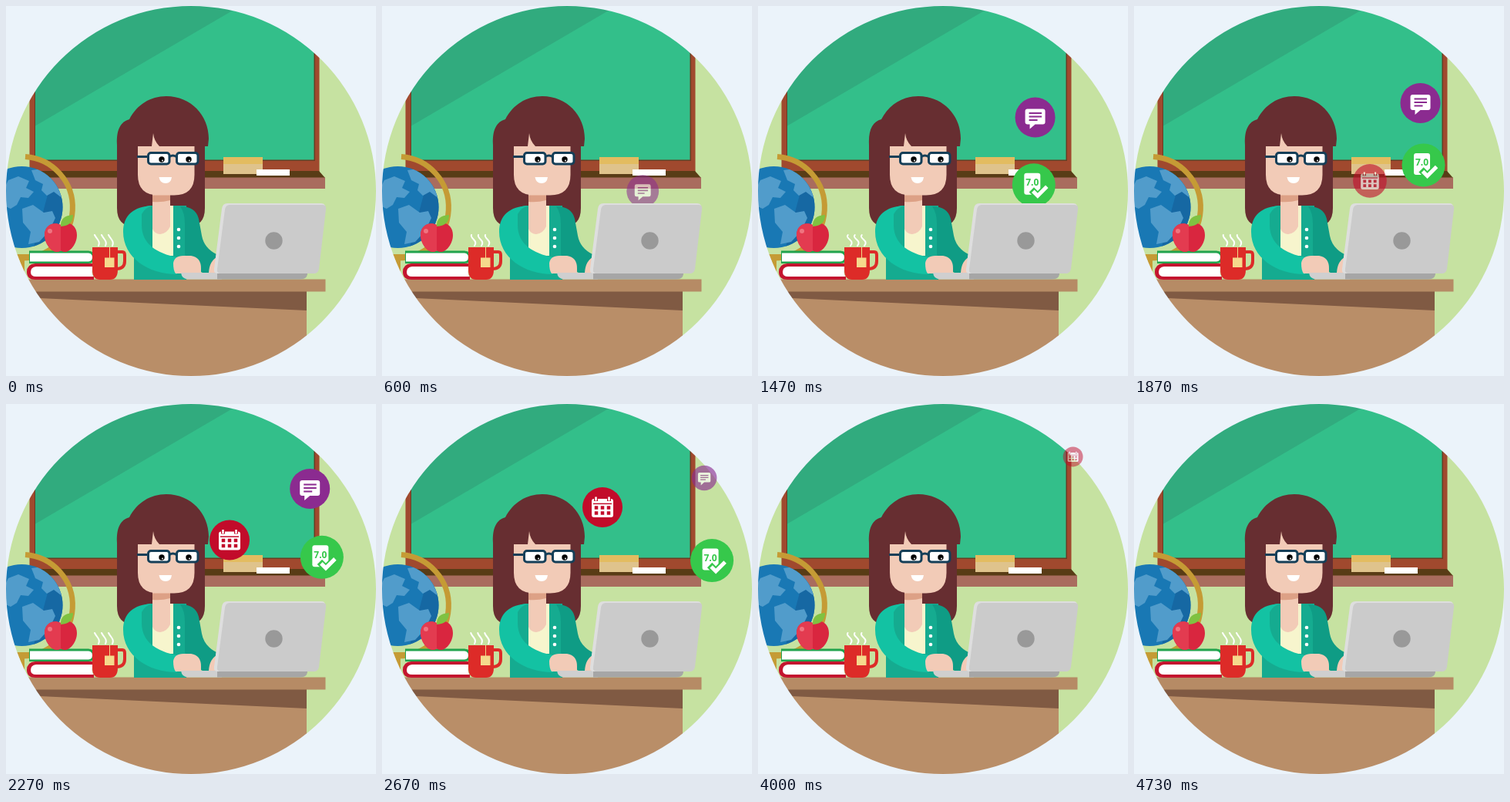
Animation of 480 by 480 pixels, one loop 4.79 s. Source, as an HTML page:

```html
<!DOCTYPE html>
<html lang="en">
<head>
<meta charset="utf-8">
<title>Teacher at her desk</title>
<style>
html, body { margin: 0; height: 100%; overflow: hidden; background: #ebf3fa; }
svg { display: block; width: 100vw; height: 100vh; }
text { font: bold 12px "Open Sans", sans-serif; text-anchor: middle; }
</style>
</head>
<body>
<svg viewBox="0 0 480 480">
  <clipPath id="sphere"><circle cx="20.500" cy="261" r="53"/></clipPath>
  <path fill="#c6e2a1" d="M0 0H480V480H0z"/>

  <g id="board">
    <path fill="#a0492e" d="M30.500 0H406.500V215H30.500z"/>
    <path fill="#6a3c22" d="M37 0H401V201H37z"/>
    <path fill="#33bf8a" d="M38 0H399.500V199.500H38z"/>
    <path fill="#31ab7e" d="M38 0H304L38 155.500z"/>
    <path fill="#593c16" d="M30 214H406L414 223H22z"/>
    <path fill="#a96c5e" d="M22 222.500H414V237H22z"/>
    <path fill="#e3bc60" d="M282 196H333V205H282z"/>
    <path fill="#dfc38c" d="M282 205H333V218H282z"/>
    <path fill="#fff" d="M325 212H368V220H325z"/>
  </g>

  <g id="globe">
    <path fill="none" stroke="#c59b35" stroke-width="7" d="M25 195.500A65.850 65.850 0 0 1 18 327"/>
    <path fill="#c59b35" d="M8 322H30V330H8zM18 328H24V355H18z"/>
    <g clip-path="url(#sphere)">
      <path fill="#1978b4" d="M-40 200H80V320H-40z"/>
      <path fill="#1668a3" d="M62 215L80 230V320H34z"/>
      <g fill="#519ccb">
        <path d="M-5 242L3 226 16 221 30 227 26 236 36 241 29 249 19 248 14 258 6 263-5 258z"/>
        <path d="M33 213L48 211 66 228 74 250 62 241 53 246 46 239 48 231 38 226z"/>
        <path d="M21 263L35 258 49 268 60 266 64 275 56 292 43 306 29 309 32 293 22 281z"/>
      </g>
    </g>
  </g>

  <g id="desk">
    <path fill="#b98e68" d="M0 370H390V480H0z"/>
    <path fill="#805a43" d="M0 370H390V395L0 377z"/>
    <path fill="#b68b65" d="M0 354.500H414.500V370.500H0z"/>
  </g>

  <g id="books">
    <path fill="#22a34d" d="M30 317.500H107Q115 318 115 326T107 334H30z"/>
    <path fill="#fff" d="M31 320.500H107Q112 321 112 326T107 331.500H31z"/>
    <path fill="#c4152f" d="M38 334H114V338H110V351H114V355H38Q27 355 27 345T38 334z"/>
    <path fill="#fff" d="M39 338H113Q110 345 113 351H39Q32 351 32 345T39 338z"/>
  </g>

  <g id="apple">
    <path fill="#d9263f" d="M71 284C82 278 92 285 92 297C92 309 83 319 77 319Q74 319 71 317.500Q68 319 65 319C58 318 50 308 50 297C50 285 61 279 71 284z"/>
    <path fill="#e33b50" d="M71 284C61 279 50 285 50 297C50 308 58 318 65 319Q68 319 71 317.500z"/>
    <circle cx="57" cy="292" r="3" fill="#ef7480"/>
    <path fill="#7fc241" d="M71 286Q70 272 87 271Q87 285 71 286z"/>
  </g>

  <g id="mug">
    <path fill="none" stroke="#dd2b28" stroke-width="4" d="M144 319H151Q154 319 154 323V331Q154 341 143 341"/>
    <path fill="#dd2b28" d="M112 313H145V342Q145 355 135 355H122Q112 355 112 342z"/>
    <path stroke="#f3d988" d="M134.500 313V327"/>
    <path fill="#f5d98c" d="M128 326.500H140.500V339H128z"/>
    <path id="steam" fill="none" stroke="#fff" stroke-width="2" stroke-linecap="round"/>
  </g>

  <g id="teacher">
    <path fill="#672e31" d="M144 180C143 160 149 150 160 147C170 128 187 117 208 117C240 117 263 142 263 172L262 182H258V262Q258 286 236 286H166Q144 286 144 262z"/>
    <path fill="#f2cbb7" d="M171 182H189L191 165Q192 175 199 182H244.500V219Q244.500 245.500 218 245.500H198Q171 245.500 171 219z"/>
    <path fill="#15ab90" d="M166 300H176V262Q182 259 190 259H234V355H166z"/>
    <path fill="#0f9c85" d="M226 260Q246 260 250 276L254 298Q257 314 273 322L267 349Q240 345 232 322V282Q232 268 226 260z"/>
    <path fill="#f7f5cd" d="M190 259H217V324H190z"/>
    <path fill="#f2cbb7" d="M190 244H213V286Q209 295 200 296Q193 296 190 289z"/>
    <path fill="#dda186" d="M190 245.500H213V252Q202 255 190 254z"/>
    <path fill="#13c2a3" d="M190 259C165 260 152 272 152 293C152 326 184 348 222 348V326C196 321 176 309 176 284V270Q181 261 190 259z"/>
    <g fill="#fff">
      <circle cx="224" cy="290" r="2.300"/>
      <circle cx="224" cy="301" r="2.300"/>
      <circle cx="224" cy="312" r="2.300"/>
    </g>
    <path fill="#f2cbb7" d="M217 334Q218 324 230 324H240Q253 326 253 340V347H220Q217 343 217 334zM275 325Q264 330 263 346H276z"/>
    <path fill="#fff" d="M198.500 222H215Q214 230 207 230T198.500 222z"/>
    <g fill="#fff" stroke="#153f58" stroke-width="3">
      <path fill="none" d="M170 195.500H185M212 195.500Q216.500 192.500 221 195.500"/>
      <rect x="184.500" y="190.500" width="27.500" height="14.500" rx="3.500"/>
      <rect x="221.500" y="190.500" width="27.500" height="14.500" rx="3.500"/>
    </g>
    <circle cx="202" cy="199" r="3.700"/>
    <circle cx="237" cy="199" r="3.700"/>
    <g fill="#fff">
      <circle cx="203" cy="200.500" r="1"/>
      <circle cx="238" cy="200.500" r="1"/>
    </g>
  </g>

  <path id="surround" fill="#ebf3fa" fill-rule="evenodd"
    d="M0 0H480V480H0zM0 240A240 240 0 0 0 480 240A240 240 0 0 0 0 240z"/>

  <g id="chat">
    <circle r="26" fill="#8b2b90"/>
    <path fill="#fff" d="M-10-11H10Q13-11 13-8V6Q13 9 10 9H0L-7 15V9H-10Q-13 9-13 6V-8Q-13-11-10-11z"/>
    <path stroke="#8b2b90" stroke-width="2" d="M-8-5.500H8.500M-8-1H8.500M-8 3.500H3"/>
  </g>
  <g id="grade">
    <circle r="28" fill="#36c84b"/>
    <rect x="-12.500" y="-15.500" width="21" height="28" rx="3" fill="#fff"/>
    <text x="-2" y="1" fill="#36c84b">7.0</text>
    <g fill="none">
      <path stroke="#36c84b" stroke-width="9" d="M-3 6L5 14 18 1"/>
      <path stroke="#fff" stroke-width="5" d="M-1 8L5 14 17 2"/>
    </g>
  </g>
  <g id="calendar">
    <circle r="26" fill="#c20b2a"/>
    <rect x="-14" y="-11" width="28" height="24" rx="3" fill="#fff"/>
    <g stroke="#c20b2a">
      <path stroke-width="5" d="M-8.500-12V-8M8.500-12V-8"/>
      <path stroke-width="1.500" d="M-12-4.500H12"/>
      <path stroke-width="4.500" stroke-dasharray="4.500 3.500" d="M-10.250 .500H11M-10.250 7.500H11"/>
    </g>
    <path stroke="#fff" stroke-width="2.500" d="M-8.500-13.500V-8.500M8.500-13.500V-8.500"/>
  </g>

  <g id="laptop">
    <path fill="#cfcfcf" d="M227 346H280V354.500H236Q228 354 227 346z"/>
    <path fill="#a6a6a6" d="M274 345H391V348Q390 354.500 382 354.500H274z"/>
    <path fill="#dedede" d="M287 256H409Q415 256 414 263L405 341Q404 347 398 347H275Q269 347 270 341L280 263Q281 256 287 256z"/>
    <path fill="#cbcbcb" d="M290 258H411Q416 258 415 264L406 341Q405 347 399 347H279Q273 347 274 341L284 264Q285 258 290 258z"/>
    <circle cx="347.500" cy="304.500" r="11.200" fill="#999"/>
  </g>
</svg>
<script>
const LOOP = 4790, FADE = 540;
const el = id => document.getElementById(id);

// Each stop is [time, x, y]; icons grow in after the first and shrink out before the last.
const icons = [
  ['chat', [[300, 328, 288], [1070, 353, 172], [1600, 362, 138], [1870, 371.500, 126],
            [2130, 386, 115], [2670, 418, 96], [3010, 440, 82]]],
  ['grade', [[850, 340, 286], [1070, 344, 262], [1870, 375.500, 206.500],
             [2130, 402, 199], [2670, 428, 203], [3240, 467, 218]]],
  ['calendar', [[1546, 330, 275], [1870, 306, 227], [2670, 286, 134],
                [3400, 337.500, 93], [4000, 408.500, 68.500], [4270, 438, 46]]]
];

const slope = (p, i, axis) => {
  const a = p[Math.max(i - 1, 0)], b = p[Math.min(i + 1, p.length - 1)];
  return (b[axis] - a[axis]) / (b[0] - a[0]);
};

// Cubic Hermite curve through the stops
function along(p, t, axis) {
  let i = 0;
  while (i < p.length - 2 && t > p[i + 1][0]) i++;
  const span = p[i + 1][0] - p[i][0], u = (t - p[i][0]) / span, v = 1 - u;
  return v * v * (1 + 2 * u) * p[i][axis] + u * u * (3 - 2 * u) * p[i + 1][axis]
    + span * u * v * (v * slope(p, i, axis) - u * slope(p, i + 1, axis));
}

function drawIcon([id, path], t) {
  const grow = Math.min(1, (t - path[0][0]) / FADE);
  const shrink = Math.min(1, (path.at(-1)[0] - t) / FADE);
  const alpha = Math.min(grow, shrink);
  const icon = el(id);
  icon.style.display = alpha > 0 ? '' : 'none';
  if (alpha <= 0) return;
  const size = Math.min(grow * (2 - grow), shrink);
  icon.setAttribute('transform',
    `translate(${along(path, t, 1)} ${along(path, t, 2)}) scale(${size})`);
  icon.setAttribute('opacity', alpha);
}

function drawSteam(t) {
  const sway = -Math.cos(4 * Math.PI * t / LOOP);
  el('steam').setAttribute('d', [120, 129, 138].map(x =>
    `M${x} 311q${3 + sway}-4-1-8t${-3 + sway}-6`).join(''));
}

function frame() {
  const t = performance.now() % LOOP;
  icons.forEach(icon => drawIcon(icon, t));
  drawSteam(t);
  requestAnimationFrame(frame);
}
frame();
</script>
</body>
</html>
```
